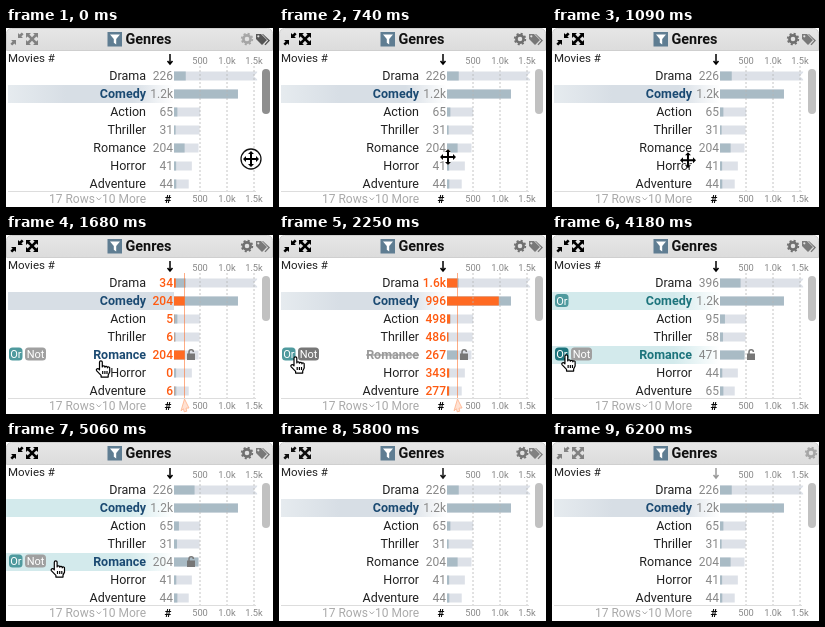
An HTML page for the animation above (6.3 s loop, 267 by 179 pixels).

```html
<!DOCTYPE html>
<html lang="en">
<head>
<meta charset="utf-8">
<title>Genres</title>
<style>
html, body { margin: 0; width: 100%; height: 100%; overflow: hidden; background: #fff; }
svg { display: block; width: 100vw; height: 100vh; font-family: Roboto, sans-serif; }
.label { font-size: 12.5px; text-anchor: end; fill: #222; }
.num { font-size: 12px; text-anchor: end; }
.tick { font-size: 9.3px; text-anchor: middle; fill: #888; }
.foot { font-size: 12px; fill: #aaa; }
.badge { font-size: 11px; text-anchor: middle; fill: #fff; }
.line { fill: none; stroke: #000; stroke-width: 1.5; }
</style>
</head>
<body>
<svg viewBox="0 0 267 179" preserveAspectRatio="none">
  <defs>
    <linearGradient id="blue"><stop stop-color="#e6ebef"/><stop offset=".35" stop-color="#d7dee5"/><stop offset=".75" stop-color="#d7dee5"/><stop offset="1" stop-color="#d7dee5" stop-opacity="0"/></linearGradient>
    <linearGradient id="teal"><stop stop-color="#d3eaec" stop-opacity="0"/><stop offset=".1" stop-color="#d3eaec"/><stop offset=".75" stop-color="#d3eaec"/><stop offset="1" stop-color="#d3eaec" stop-opacity="0"/></linearGradient>
    <linearGradient id="head" x2="0" y2="1"><stop stop-color="#e6e6e6"/><stop offset="1" stop-color="#dcdcdc"/></linearGradient>
    <path id="arrows" d="M0-8L3-5H1V-1H5V-3L8 0L5 3V1H1V5H3L0 8L-3 5H-1V1H-5V3L-8 0L-5-3V-1H-1V-5H-3Z"/>
  </defs>
  <rect width="267" height="179" fill="#fff"/>
  <path d="M.5 22.500V5.500a5 5 0 0 1 5-5H261.500a5 5 0 0 1 5 5V22.500Z" fill="url(#head)" stroke="#cfcfcf"/>
  <g id="resize">
    <path d="M10 12v5l-1.600-1.600-2.200 2.200-1.800-1.800 2.200-2.200L5 12ZM12 10V5l1.600 1.600 2.200-2.200 1.800 1.800-2.200 2.200L17 10Z"/>
    <path d="M20 5h5l-1.600 1.600L26 9.200l2.600-2.600L27 5h5v5l-1.600-1.600L27.800 11l2.600 2.600L32 12v5h-5l1.600-1.600L26 12.800l-2.600 2.600L25 17h-5v-5l1.600 1.600L24.200 11 21.600 8.400 20 10Z"/>
  </g>
  <rect x="101.500" y="4" width="14.500" height="14.500" fill="#5f7d92"/>
  <path d="M104 6.500h10l-3.800 4.500v5.500l-2.400-1.800V11Z" fill="#fff"/>
  <text x="119.500" y="16" font-size="14.4" font-weight="700" fill="#111">Genres</text>
  <g id="gear">
    <circle r="3.600" fill="none" stroke="#000" stroke-width="2.600"/>
    <circle r="5.300" fill="none" stroke="#000" stroke-width="1.800" stroke-dasharray="2.080 2.080"/>
  </g>
  <g id="tag">
    <path d="M250 6h5l6 6-5 5-6-6ZM257 6l7 6.500-4.500 4.800-1-.9 3.600-4L256 6Z"/>
    <circle cx="252.300" cy="8.300" r="1.100" fill="#ddd"/>
  </g>
  <text x="2" y="34" font-size="11.5" fill="#222">Movies #</text>
  <path id="sort" class="line" d="M164 26v9M161.500 33l2.500 3 2.500-3"/>
  <g id="rows"></g>
  <g id="ticks"></g>
  <g id="mark">
    <path d="M178.500 38V164" stroke="#ff6a22" stroke-opacity=".55"/>
    <path d="M178.500 164l4.500 9-3 .2.800 3-2.600.6-.8-3-2.400 2Z" fill="#ffe1d2" stroke="#ffb08a" stroke-width=".8"/>
  </g>
  <path d="M2 163.500H250" stroke="#ddd"/>
  <rect id="thumb" x="256" y="41" width="8" height="45" rx="4"/>
  <text class="foot" x="43" y="175">17 Rows</text>
  <path d="M90.500 169.500l2.300 2.500 2.300-2.500" fill="none" stroke="#aaa"/>
  <text class="foot" x="96" y="175">10 More</text>
  <text x="162" y="175" font-size="11.5" font-weight="700" text-anchor="middle">#</text>
  <g id="lock" fill="none" stroke="#777">
    <rect x="181.500" y="119" width="7" height="5.500" fill="#777"/>
    <path d="M183 119v-2a2.200 2.200 0 0 1 4.400 0" stroke-width="1.500"/>
  </g>
  <g id="orTop"><rect x="3" y="59" width="13.500" height="13" rx="3.500" fill="#4f9a9e"/><text class="badge" x="9.800" y="69.500">Or</text></g>
  <g id="or"><rect id="orBox" x="3" y="112.500" width="13.500" height="13" rx="3.500"/><text class="badge" x="9.800" y="123">Or</text></g>
  <g id="not"><rect id="notBox" x="19" y="112.500" width="21" height="13" rx="3.500"/><text class="badge" x="29.500" y="123">Not</text></g>
  <circle id="ring" r="10" fill="#fff" fill-opacity=".85" stroke="#111" stroke-width="1.300"/>
  <g id="cursor">
    <use id="move" href="#arrows" stroke="#fff" stroke-width="1" paint-order="stroke"/>
    <path id="hand" transform="translate(-7.500 -9)" fill="#fff" stroke="#000" stroke-width="1.200" stroke-linejoin="round"
      d="M4 2.200a1.400 1.400 0 0 1 2.800 0V7a1.300 1.300 0 0 1 2.600.2 1.300 1.300 0 0 1 2.500.6 1.200 1.200 0 0 1 2.300.7v3.600l-1.500 3v2H5.600v-1.800L1 10.600a1.400 1.400 0 0 1 2-1.800l1 1ZM7.200 11v3M9.400 11v3M11.500 11v3"/>
  </g>
</svg>
<script>
const LOOP = 6300, X0 = 168, SCALE = 0.052;
const HOVER = 1150, NOT = 1980, CLEAR = 2340, PICK = 3010, DROP = 5040, LEAVE = 5700;
const $ = id => document.getElementById(id);
const clamp = v => Math.max(0, Math.min(1, v));
const lerp = (a, b, p) => a + (b - a) * p;
const ramp = (t, a, b) => { const p = clamp((t - a) / (b - a)); return p * p * (3 - 2 * p); };
const within = (t, a, b) => t >= a && t < b;
const show = (id, p) => $(id).setAttribute("opacity", +p);
const format = n => n < 1000 ? String(n) : (n / 1000).toFixed(1) + "k";

function add(parent, tag, attrs, text) {
  const el = document.createElementNS("http://www.w3.org/2000/svg", tag);
  for (const k in attrs) el.setAttribute(k, attrs[k]);
  if (text) el.textContent = text;
  return parent.appendChild(el);
}

// name, total, selected, and-preview, not-preview, or-result
const rows = [
  ["Drama", 1600, 226, 34, 1600, 396],
  ["Comedy", 1230, 1230, 204, 996, 1230],
  ["Action", 503, 65, 5, 498, 95],
  ["Thriller", 492, 31, 6, 486, 58],
  ["Romance", 471, 204, 204, 267, 471],
  ["Horror", 343, 41, 0, 343, 44],
  ["Adventure", 283, 44, 6, 277, 65]
].map(([name, total, base, and, not, or], i) => {
  const y = 48 + 18 * i, g = $("rows");
  const bar = (w, fill) => add(g, "rect", { x: X0, y: y - 4.5, width: w, height: 9, fill });
  const back = fill => add(g, "rect", { x: 2, y: y - 9, width: 166, height: 18, fill, opacity: 0 });
  const row = { name, total, base, and, not, or };
  if (name === "Comedy" || name === "Romance") {
    row.blue = back("url(#blue)");
    row.solid = back("#d7dee5");
    row.teal = back("url(#teal)");
  }
  row.light = bar(Math.min(total * SCALE, 84), "#dde1e8");
  if (name === "Drama") add(g, "path", { d: `M252.500 ${y - 4.5}l-5 4.500 5 4.500Z`, fill: "#fff" });
  row.active = bar(0, "#a9bbc5");
  row.hot = bar(0, "#ff6a22");
  row.label = add(g, "text", { class: "label", x: 140, y: y + 4 }, name);
  row.num = add(g, "text", { class: "num", x: 167, y: y + 4 });
  return row;
});

[["500", 194], ["1.0k", 221], ["1.5k", 248]].forEach(([s, x]) => {
  const g = $("ticks");
  add(g, "path", { d: `M${x} 38V164`, stroke: "#b5b5b5", "stroke-width": 0.8, "stroke-dasharray": "2 2" });
  add(g, "text", { class: "tick", x, y: 36 }, s);
  add(g, "text", { class: "tick", x, y: 174 }, s);
});

// time, x, y
const path = [
  [0, 245, 131], [50, 245, 131], [680, 169, 129], [760, 169, 129], [1320, 117, 134], [1380, 111, 134],
  [1620, 111, 134], [1680, 97, 134], [2000, 30, 129], [2250, 18.5, 130], [2310, 15.5, 128], [4150, 15.5, 128],
  [4470, 51, 128], [5040, 52, 127], [5690, -12, 132], [LOOP, -12, 132]
];

function cursorAt(t) {
  const i = path.findIndex(p => p[0] > t);
  const [t0, x0, y0] = path[i - 1], [t1, x1, y1] = path[i];
  const p = ramp(t, t0, t1);
  return [lerp(x0, x1, p), lerp(y0, y1, p)];
}

function drawRow(r, t) {
  const and = within(t, HOVER, NOT), not = within(t, NOT, CLEAR), or = within(t, PICK, DROP);
  const preview = and || not, hover = within(t, HOVER, LEAVE);
  const comedy = r.name === "Comedy", romance = r.name === "Romance";
  r.num.textContent = format(and ? r.and : not ? r.not : or ? r.or : r.base);
  r.num.setAttribute("fill", preview ? "#ff5a10" : "#888");
  r.num.setAttribute("font-weight", preview ? 500 : 400);

  const grown = ramp(t, 3180, 3940) - ramp(t, DROP, 5690);
  r.active.setAttribute("width", Math.min(lerp(r.base, r.or, grown) * SCALE, 84));
  // orange marks the part of the selection that the preview would keep
  const hot = lerp(r.and, Math.min(r.not, r.base - r.and), ramp(t, NOT, 2240));
  r.hot.setAttribute("width", hot * SCALE * ramp(t, HOVER, 1330) * (1 - ramp(t, CLEAR, 2590)));

  if (!comedy && !romance) return;
  const fade = 1 - ramp(t, DROP + 60, LEAVE), sweep = ramp(t, 3120, 3590);
  const left = lerp(168, -16, sweep);
  r.teal.setAttribute("x", left);
  r.teal.setAttribute("width", 168 - left);
  r.teal.setAttribute("opacity", fade);
  r.blue.setAttribute("opacity", comedy ? 1 - sweep * fade : 0);
  r.solid.setAttribute("opacity", comedy && and ? 1 : 0);
  const struck = romance && not, strong = comedy || hover;
  r.label.setAttribute("font-weight", strong ? 700 : 400);
  r.label.setAttribute("text-decoration", struck ? "line-through" : "none");
  r.label.style.fill = struck ? "#999" : or ? "#1d747c" : strong ? "#1b4a72" : "#222";
}

function draw(t) {
  const gone = ramp(t, LEAVE, 6150), awake = ramp(t, 50, 350) - gone;
  const or = within(t, PICK, DROP), hover = within(t, HOVER, LEAVE);
  rows.forEach(r => drawRow(r, t));

  show("resize", lerp(0.42, 1, awake));
  show("gear", lerp(0.26, 0.5, awake));
  show("tag", lerp(0.62, 0.46, awake) * (1 - gone));
  $("gear").setAttribute("transform", `translate(${lerp(241, 259, gone)} 11)`);
  show("sort", lerp(1, 0.4, gone));
  $("thumb").setAttribute("fill", t < 300 ? "#8e8e8e" : "#c1c1c1");

  show("mark", ramp(t, HOVER, 1330) * (1 - ramp(t, CLEAR, 2590)));
  show("lock", hover);
  $("lock").setAttribute("transform", `translate(${or ? 14 : 0} 0)`);
  show("orTop", or);
  show("or", hover);
  show("not", within(t, HOVER, PICK) || within(t, 4180, LEAVE));
  $("orBox").setAttribute("fill", within(t, CLEAR, 4200) ? "#1d747c" : "#4f9a9e");
  $("notBox").setAttribute("fill", within(t, NOT, CLEAR) ? "#777" : "#a0a0a0");

  const [x, y] = cursorAt(t), hand = t >= 1100;
  $("cursor").setAttribute("transform", `translate(${x} ${y})`);
  show("hand", hand);
  show("move", !hand);
  $("ring").setAttribute("cx", hand ? x - 2 : x);
  $("ring").setAttribute("cy", hand ? y - 9 : y);
  show("ring", t < 110 || within(t, PICK, 3180) || within(t, 4650, 4820));
}

const start = performance.now();
function tick() {
  draw((performance.now() - start) % LOOP);
  requestAnimationFrame(tick);
}
tick();
</script>
</body>
</html>
```
